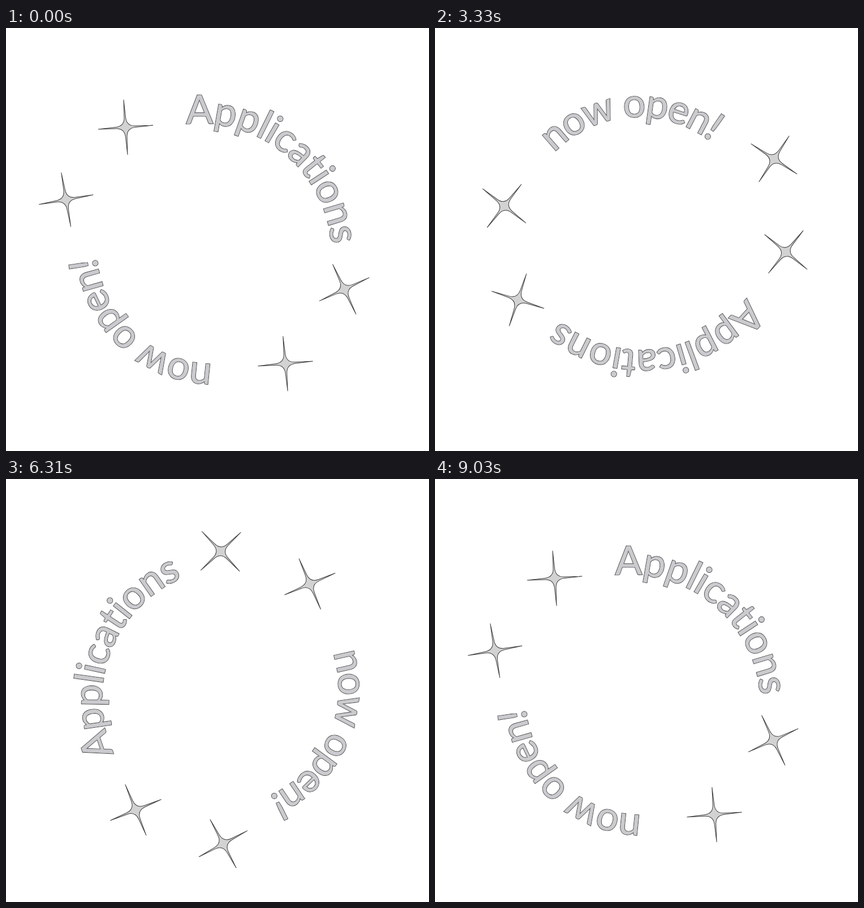
An HTML page for the animation above (9070 ms loop, 748x748 px).

```html
<!DOCTYPE html>
<html lang="en">
<head>
<meta charset="utf-8">
<title>Applications now open!</title>
<style>
  html, body { margin: 0; width: 100%; height: 100%; overflow: hidden; background: #fff; }
  svg { display: block; width: 100vw; height: 100vh; }
  text { font: 400 70px Lato, "Open Sans", sans-serif; text-anchor: middle; }
  .edge { fill: #484848; stroke: #484848; stroke-width: 2.2; }
  .face { fill: #cbcbcf; stroke: #cbcbcf; stroke-width: .5; }
  .star { fill: #d2d2d2; stroke: #404040; stroke-width: 1; stroke-linejoin: round; }
</style>
</head>
<body>
<svg viewBox="0 0 748 748"><g id="ring"></g></svg>
<script>
const LOOP = 9070, STEPS = 216, PHASE = .34;
const CENTER = [368.4, 373.9];

// Each word is centred on its own arc, at the given direction in degrees
const WORDS = [
  { text: "Applications", x: 344.5, y: 400.5, radius: 231.5, direction: -50.5, spacing: -.6 },
  { text: "now open!", x: 367.7, y: 386.1, radius: 208, direction: 132.3, spacing: -2.4 }
];

const STARS = [
  { x: 211.5, y: 175.5, tilt: -4.1 },
  { x: 106.2, y: 303.5, tilt: -10 },
  { x: 598.3, y: 462, tilt: -25.1 },
  { x: 494, y: 593.5, tilt: -4.9 }
];

const ring = document.getElementById("ring");

function add(parent, tag, attrs) {
  const node = document.createElementNS("http://www.w3.org/2000/svg", tag);
  for (const key in attrs) node.setAttribute(key, attrs[key]);
  return parent.appendChild(node);
}

function addWord({ text, x, y, radius, direction, spacing }, index) {
  const group = add(ring, "g", { transform: `translate(${x} ${y}) rotate(${direction + 90})` });
  const id = `arc${index}`;
  add(group, "path", { id, fill: "none", d: `M${-radius} 0A${radius} ${radius} 0 0 1 ${radius} 0` });
  for (const layer of ["edge", "face"]) {
    const label = add(group, "text", { class: layer, "letter-spacing": spacing });
    add(label, "textPath", { href: `#${id}`, startOffset: "50%" }).textContent = text;
  }
}

// Four needle arms joined by concave curves
function starPath(length, flare, width, waist) {
  let d = "";
  for (let turn = 0; turn < 4; turn++) {
    const c = Math.round(Math.cos(turn * Math.PI / 2)), s = Math.round(Math.sin(turn * Math.PI / 2));
    const at = (x, y) => `${x * c - y * s} ${x * s + y * c}`;
    d += `${turn ? "L" : "M"}${at(0, -length)}L${at(width, -flare)}Q${at(waist, -waist)} ${at(flare, -width)}`;
  }
  return d + "Z";
}

WORDS.forEach(addWord);
const shape = starPath(48.5, 17, 1.3, 2);
for (const { x, y, tilt } of STARS) {
  add(ring, "path", { class: "star", d: shape, transform: `translate(${x} ${y}) rotate(${tilt})` });
}

function draw(ms) {
  const progress = ms % LOOP / LOOP;
  const step = Math.min(STEPS, Math.floor(progress * (STEPS + 1) + PHASE));
  ring.setAttribute("transform", `rotate(${step * 360 / STEPS} ${CENTER})`);
}

let start;
function tick(now) {
  start ??= now;
  draw(Math.max(0, now - start));
  requestAnimationFrame(tick);
}
draw(0);
requestAnimationFrame(tick);
</script>
</body>
</html>
```
